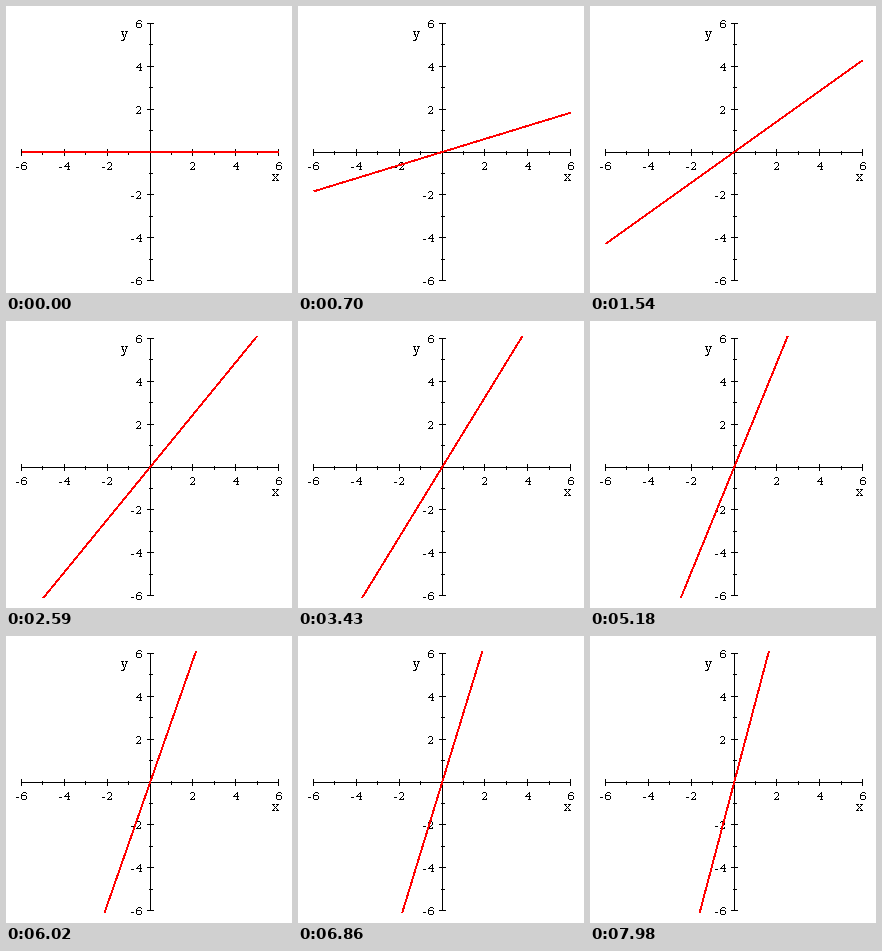
These frames come from a looping animation (286 by 287 pixels, 8000 ms). A matplotlib script:

```python
import math

import matplotlib.pyplot as plt
import numpy as np
from matplotlib.animation import FuncAnimation
from matplotlib.collections import LineCollection

plt.rcParams.update({
    "font.family": "DejaVu Serif",
    "text.hinting": "default",
    "text.hinting_factor": 1,
})

WIDTH, HEIGHT, DPI = 286, 287, 64
PX = 72 / DPI                      # points per pixel
LOOP_MS, TICK_MS = 8000, 10
CX, CY, UNIT = 144, 146, 21.43
PEN_X = CX + 0.25                  # the red line runs between pixel centres

fig = plt.figure(figsize=(WIDTH / DPI, HEIGHT / DPI), dpi=DPI, facecolor="white")
ax = fig.add_axes([0, 0, 1, 1])
ax.set_xlim(0, WIDTH)
ax.set_ylim(HEIGHT, 0)
ax.axis("off")


def label(x, y, text, size=11, ha="center"):
    ax.text(x, y, text, fontsize=size * PX, ha=ha, va="baseline",
            color="black", antialiased=False)


segments = [[(15, CY + 0.5), (273, CY + 0.5)],
            [(CX + 0.5, 17), (CX + 0.5, 275)]]
for value in range(-6, 7):
    if value == 0:
        continue
    major = value % 2 == 0
    x = math.floor(CX + value * UNIT) + 0.5
    y = math.floor(CY - value * UNIT) + 0.5
    before, after = (3, 4) if major else (1, 3)
    segments.append([(x, CY - before), (x, CY + after)])
    segments.append([(CX - before, y), (CX + after, y)])
    if major:
        label(x, 164, str(value))
        label(136, y + 4.5, str(value), ha="right")
label(269.5, 175, "x", 13)
label(118.5, 32, "y", 13)

axes_lines = LineCollection(segments, colors="black", linewidths=PX)
axes_lines.set_snap(False)
ax.add_collection(axes_lines)

# Offsets of every pixel centre from the origin of the plot.
rows, cols = np.mgrid[:HEIGHT, :WIDTH] + 0.5
right, up = cols - PEN_X, CY - rows
plot_area = (cols > 15) & (cols < 273) & (rows > 15) & (rows < 277)
pen = np.zeros((HEIGHT, WIDTH, 4), np.uint8)
pen[..., 0] = 255
pen_image = fig.figimage(pen, origin="upper", zorder=5)


def step_at(ms):
    """Steps last 210 ms; the first of every sixteen lasts 280 ms."""
    group, rest = divmod(ms, 3430)
    return 16 * group + max(0, (rest - 70) // 210)


def update(frame):
    """Draw y = slope * x from -6 to 6 with a hard-edged pen 2 px wide."""
    slope = step_at(frame * TICK_MS) * 5 / 49
    norm = math.hypot(1, slope)
    across = np.abs(up - slope * right) / norm
    along = np.abs(right + slope * up) / norm
    inked = plot_area & (across < 1) & (along < 6 * UNIT * norm)
    pen[..., 3] = 255 * inked
    pen_image.set_data(pen)
    return pen_image,


anim = FuncAnimation(fig, update, frames=LOOP_MS // TICK_MS, interval=TICK_MS,
                     repeat=True, repeat_delay=0, blit=False)
plt.show()
```
